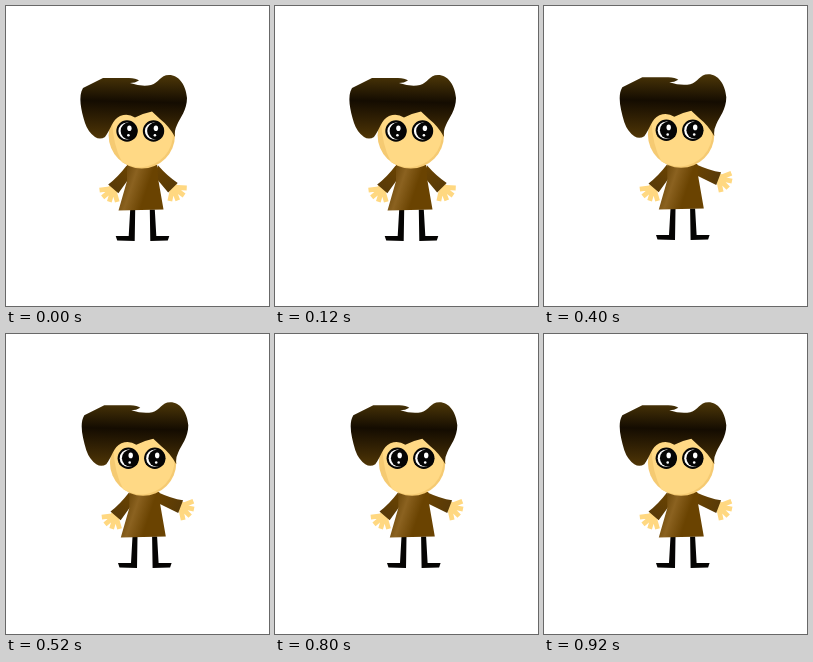
Animation of 263 by 300 pixels, one loop 1 s. Source, as an HTML page:

```html
<!DOCTYPE html>
<html lang="en">
<head>
<meta charset="utf-8">
<title>Waving character</title>
<style>
html, body { margin: 0; width: 100%; height: 100%; overflow: hidden; background: #fff; }
svg { display: block; width: 100vw; height: 100vh; }
</style>
</head>
<body>
<svg viewBox="0 0 263 300" preserveAspectRatio="none">
  <defs>
    <linearGradient id="hairFill" x1="0" y1="0" x2="-.04" y2="1">
      <stop offset="0" stop-color="#493407"/>
      <stop offset=".4" stop-color="#140c01"/>
      <stop offset="1" stop-color="#503606"/>
    </linearGradient>
    <linearGradient id="coat" gradientUnits="userSpaceOnUse" x1="114" y1="180" x2="156" y2="194">
      <stop offset="0" stop-color="#6d480a"/>
      <stop offset=".25" stop-color="#8b6220"/>
      <stop offset=".6" stop-color="#6a4301"/>
    </linearGradient>
    <linearGradient id="cuff">
      <stop offset="0" stop-color="#6a4301"/>
      <stop offset="1" stop-color="#583a08"/>
    </linearGradient>
    <path id="leg" fill="#050403" d="M0 0 H5 L6.5 26.5 L19.5 26.5 L18 31 L.5 31.5 Z"/>
    <g id="arm">
      <path id="fingers" fill="none" stroke="#ffd881" stroke-width="4.8"/>
      <circle cx="23" r="5" fill="#ffd881"/>
      <path fill="url(#cuff)" d="M-3 -5 Q12 -4 23.5 -6.5 V7 L2 5 Z"/>
    </g>
    <g id="eye">
      <circle r="10.7" fill="#050505"/>
      <circle r="8.6" fill="#fff"/>
      <circle cx="2" r="8.4" fill="#050505"/>
      <ellipse cx="2.4" cy="-2.8" rx="2.2" ry="2.8" fill="#fff"/>
      <circle cx="1.4" cy="4.3" r="1.3" fill="#fff"/>
    </g>
  </defs>
  <g id="body">
    <use id="legL" href="#leg"/>
    <use id="legR" href="#leg"/>
    <use id="armL" href="#arm"/>
    <use id="armR" href="#arm"/>
    <path fill="url(#coat)" d="M121 159 H151 L152 172 L157.5 203.5 L112.5 204.5 L121 175 Z"/>
  </g>
  <g id="head">
    <circle cx="135.8" cy="129.3" r="33.2" fill="#f5ca72"/>
    <path fill="#ffd985" d="M106 113 Q107 140 116 156 A33.2 33.2 0 1 0 150 99 Z"/>
    <path fill="url(#hairFill)" d="M77 82 L97 72 L123 72 Q130 72 133 74.5 Q129 77 124 77 Q136 81 145 79 C153 77 154 69 163 69 C173 69 180 79 181 92 C181 104 174 112 171 119 Q168 125 169 131 Q163 120 154 113 L146 105.5 Q138 107 129 111.5 Q122 107 114 110 C106 114 105 123 99 131 Q94 134 89 131 Q82 126 79 117 C75 104 72 90 77 82 Z"/>
    <use href="#eye" x="121" y="125"/>
    <use href="#eye" x="147.5" y="125"/>
  </g>
</svg>
<script>
const STEP = 200, POSES = 5;
const MID = 136.5;
const el = id => document.getElementById(id);
const move = (id, value) => el(id).setAttribute('transform', value);

// Places a limb at a joint; side is -1 for the mirrored left limb.
const limb = (id, side, x, y, angle) =>
  move(id, `translate(${MID + side * x} ${y}) scale(${side} 1) rotate(${angle})`);

// Four fingers fan out from the end of the sleeve.
el('fingers').setAttribute('d', [0, 1, 2, 3].map(i => {
  const a = (33 * i - 42) * Math.PI / 180;
  return `M23 0 l${14 * Math.cos(a)} ${14 * Math.sin(a)}`;
}).join(' '));

function draw(pose) {
  const lean = Math.min(pose, 1);
  const raise = 12 * Math.min(pose, 2);
  const kick = pose === 3 ? -12 : 0;
  move('body', `translate(${2.3 * lean} ${-lean})`);
  move('head', `translate(${1.3 * lean} ${-0.8 * lean})`);
  limb('armL', -1, 14, 165, 49);
  limb('armR', 1, 14, 165, 45 - raise);
  limb('legL', -1, 7.3, 203.5, 0);
  limb('legR', 1, 7.3, 203.5, kick);
}

const start = performance.now();
function tick() {
  draw(Math.floor((performance.now() - start) / STEP) % POSES);
  requestAnimationFrame(tick);
}
tick();
</script>
</body>
</html>
```
